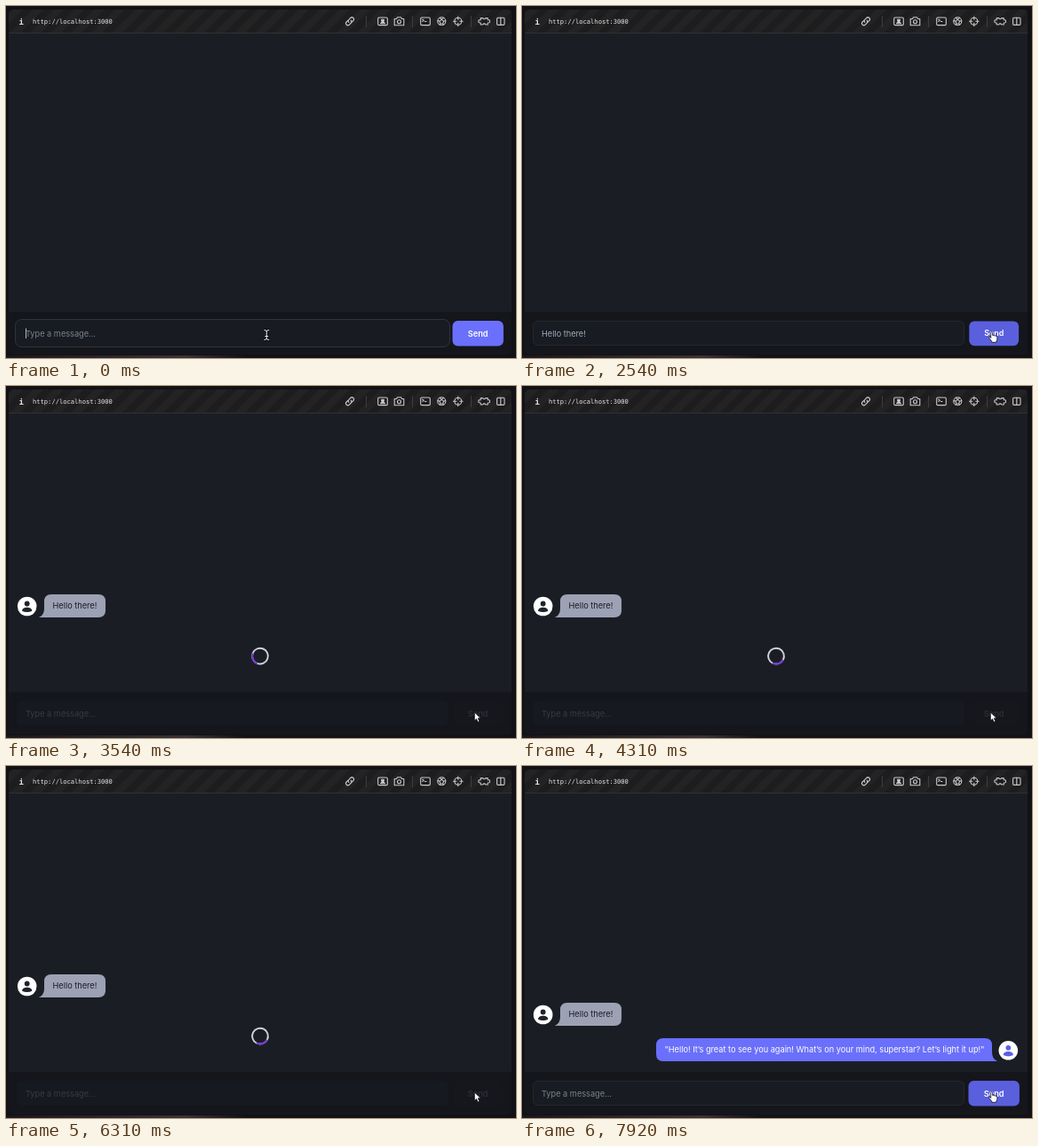
These frames come from a looping animation (574x397 px, 8000 ms). An HTML page:

```html
<!DOCTYPE html>
<html lang="en">
<head>
<meta charset="utf-8">
<title>Chat</title>
<style>
  html, body { margin: 0; height: 100%; overflow: hidden; background: #121116; }
  svg { display: block; width: 574px; height: 397px; }
  text { font: 9.2px Inter, sans-serif; white-space: pre; }
  .mono { font: 7.12px "DejaVu Sans Mono", monospace; fill: #e4e4e6; }
  .icons { fill: none; stroke: #c9c9cb; stroke-width: 1.1; stroke-linejoin: round; stroke-linecap: round; }
  .pointer { fill: #fff; stroke: #111; stroke-width: .8; stroke-linejoin: round; }
</style>
</head>
<body>
<svg viewBox="0 0 574 397">
  <defs>
    <pattern id="stripes" width="23" height="23" patternUnits="userSpaceOnUse" patternTransform="skewX(-45)">
      <rect width="23" height="23" fill="#242324"/>
      <rect width="11.5" height="23" fill="#1d1c1e"/>
    </pattern>
    <linearGradient id="glow">
      <stop offset="0" stop-color="#1b171a"/>
      <stop offset=".75" stop-color="#3a3234"/>
      <stop offset="1" stop-color="#121116"/>
    </linearGradient>
    <g id="person">
      <circle r="10.8" fill="#fff"/>
      <circle cy="-3" r="2.9"/>
      <path d="M-5.6 5.2C-5.6 2.4-3 1.2 0 1.2S5.6 2.4 5.6 5.2Q3 6.6 0 6.6T-5.6 5.2Z"/>
    </g>
  </defs>

  <rect y="394" width="270" height="3" fill="url(#glow)"/>
  <path d="M3 31V9q0-5 5-5H564q5 0 5 5V31Z" fill="url(#stripes)"/>
  <path d="M3 30H569V345H3Z" fill="#1a1e24"/>
  <path d="M3 30.5H569" stroke="#303033"/>
  <path d="M3 345H569V388q0 5-5 5H8q-5 0-5-5Z" fill="#14161b"/>

  <text class="mono" x="14.4" y="20.5" style="font-size:9px;font-weight:bold">i</text>
  <text class="mono" x="30" y="20">http://localhost:3000</text>
  <path d="M405.5 11V24M457.5 11V24M523.5 11V24" stroke="#3d3d40"/>
  <g class="icons">
    <g transform="translate(387 17.3) rotate(-45)">
      <path d="M-1-2.2H-3.2a2.2 2.2 0 0 0 0 4.4H-.6A2.2 2.2 0 0 0 1.6 0M1 2.2H3.2a2.2 2.2 0 0 0 0-4.4H.6A2.2 2.2 0 0 0-1.6 0"/>
    </g>
    <rect x="418.7" y="13" width="10.6" height="8.6" rx="1.2"/>
    <path d="M421.5 19.7H426.5L424 17.3ZM422.7 15.3H425.3V17H422.7Z" fill="#c9c9cb"/>
    <path d="M437.2 14.5H439.4L440.5 12.8H444.5L445.6 14.5H447.8V21.7H437.2Z"/>
    <circle cx="442.5" cy="17.8" r="2"/>
    <rect x="466.7" y="13" width="10.6" height="8.6" rx="1.2"/>
    <path d="M468.8 15.2L470.3 16.3L468.8 17.4M471.5 17.5H473"/>
    <circle cx="490.3" cy="17.3" r="4.5"/>
    <path d="M488.5 13.3L490.3 15.3L492.5 13.3M490.3 15.3L488 17.2L489 20H491.6L492.6 17.2ZM486 16.5L488 17.2M494.7 16.5L492.6 17.2M489 20L488 21.2M491.6 20L492.7 21.2"/>
    <circle cx="508.8" cy="17.3" r="4"/>
    <path d="M508.8 12V15.3M508.8 19.3V22.6M503.5 17.3H506.8M510.8 17.3H514.1"/>
    <path d="M534.2 13.6H536.6Q538.2 15.8 539.8 13.6H542.2V15.6Q545.2 15.4 544.4 17.3Q545.2 19.2 542.2 19V21H539.8Q538.2 18.8 536.6 21H534.2V19Q531.2 19.2 532 17.3Q531.2 15.4 534.2 15.6Z"/>
    <rect x="552.6" y="13.2" width="8.4" height="8.2" rx="1.2"/>
    <path d="M556.8 13.2V21.4"/>
  </g>

  <g id="sent">
    <use href="#person" x="23.7" y="248.5" fill="#20222c"/>
    <path d="M37 261Q43 258.5 43 251V243q0-8 8-8H104q8 0 8 8V253q0 8-8 8Z" fill="#9ca1b4"/>
    <text x="52.5" y="250.5" fill="#191c25">Hello there!</text>
  </g>
  <g id="reply">
    <path d="M535 333Q529 330.500 529 323V315q0-8-8-8H159q-8 0-8 8V325q0 8 8 8Z" fill="#6a70fb"/>
    <text x="160.500" y="322.700" fill="#fff">"Hello! It’s great to see you again! What’s on your mind, superstar? Let’s light it up!"</text>
    <use href="#person" x="547.300" y="320.800" fill="#5a60e6"/>
  </g>
  <g id="spinner" fill="none" stroke-width="1.9">
    <circle r="8.900" stroke="#d0d2d8"/>
    <circle r="8.900" stroke="#7630e0" pathLength="360" stroke-dasharray="90 270"/>
  </g>

  <rect id="field"/>
  <text id="entry" x="22" y="372.800"></text>
  <path id="caret" d="M0 363.500V375" stroke="#b4b9c4"/>
  <g id="send">
    <rect x="-28.700" y="-14.300" width="57.400" height="28.600" rx="6"/>
    <text y="3.200" text-anchor="middle" style="font-weight:600">Send</text>
  </g>

  <g id="beam" fill="none" stroke-linecap="round">
    <path id="beamShape" d="M-2.500-5.500Q0-5.500 0-4Q0-5.500 2.500-5.500M0-4V4M-2.500 5.500Q0 5.500 0 4Q0 5.500 2.500 5.500M-1.500 1.500H1.500" stroke="#111" stroke-width="2.400"/>
    <use href="#beamShape" style="stroke:#fff"/>
    <path d="M-2.500-5.500Q0-5.500 0-4Q0-5.500 2.500-5.500M0-4V4M-2.500 5.500Q0 5.500 0 4Q0 5.500 2.500 5.500M-1.500 1.500H1.500" stroke="#eee"/>
  </g>
  <path id="arrow" class="pointer" d="M-3-4.500V5L-.8 3L.8 6.600L2.600 5.800L1 2.300H4Z"/>
  <path id="hand" class="pointer" d="M-2.600-3.600Q-2.600-5-1.600-5T-.6-3.600V-.9Q.6-1.700 1.300-.6Q2.500-1.100 3-.1Q4.500-.4 4.500 1V3Q4.500 4.500 3.600 5.600V6.800H-1.600V5.700L-4.600 1.900Q-4.800.6-3.600.9L-2.600 1.900Z"/>
</svg>
<script>
  const LOOP = 8000;
  const MESSAGE = "Hello there!";
  const KEYS = [380, 460, 690, 850, 930, 1000, 1080, 1160, 1230, 1310, 1460, 1770];
  const MOVE = 1990, HOVER = 2080, PRESS = 2460, SUBMIT = 2850, WAIT = 3000, READY = 7460, REPLY = 7540;
  const BLUE = [106, 112, 252], HOVERED = [90, 95, 222], OFF = [21, 23, 28];
  const WHITE = [255, 255, 255], FAINT = [43, 46, 53];

  const $ = id => document.getElementById(id);
  const set = (el, attrs) => { for (const k in attrs) el.setAttribute(k, attrs[k]); };
  const show = (id, on) => set($(id), { visibility: on ? "visible" : "hidden" });
  const ramp = (t, start, length) => Math.min(1, Math.max(0, (t - start) / length));
  const mix = (a, b, p) => `rgb(${a.map((v, i) => v + (b[i] - v) * p)})`;

  function drawField(t) {
    const focused = t < PRESS, disabled = t >= SUBMIT && t < REPLY;
    const typed = t < WAIT ? MESSAGE.slice(0, KEYS.filter(k => k <= t).length) : "";
    const inset = focused ? 0 : 2;
    set($("field"), {
      x: 10.5 + inset, y: 353.5 + inset, width: 489 - 2 * inset, height: 31 - 2 * inset, rx: 7 - inset,
      fill: disabled ? "#16191f" : "#181c22",
      stroke: disabled ? "#16191f" : focused ? "#30343b" : "#23272e"
    });
    $("entry").textContent = typed || "Type a message...";
    set($("entry"), { fill: disabled ? (typed ? "#454951" : "#373b43") : typed ? "#a3a9b6" : "#7b818d" });
    const x = typed ? 22.5 + $("entry").getComputedTextLength() : 22.5;
    set($("caret"), { transform: `translate(${x})` });
    show("caret", t < 2270);
  }

  function drawButton(t) {
    const [box, label] = $("send").children;
    const off = ramp(t, WAIT, 200), on = ramp(t, REPLY, 200);
    box.setAttribute("fill", t < WAIT ? mix(BLUE, HOVERED, ramp(t, HOVER, 200))
      : t < REPLY ? mix(HOVERED, OFF, off) : mix(OFF, HOVERED, on));
    label.setAttribute("fill", t < REPLY ? mix(WHITE, FAINT, off) : mix(FAINT, WHITE, on));
    const scale = 1 - .035 * (ramp(t, PRESS, 100) - off);
    set($("send"), { transform: `translate(531.2 369.3) scale(${scale})` });
  }

  function drawPointer(t) {
    const p = ramp(t, MOVE, 240);
    const x = 293.3 + 237 * p * (2 - p);
    const overButton = t >= HOVER;
    const hand = overButton && (t < SUBMIT || t >= READY);
    for (const id of ["beam", "arrow", "hand"])
      set($(id), { transform: `translate(${x} ${371 + 1.5 * p})` });
    show("beam", t < KEYS[0] || (t >= MOVE && !overButton));
    show("hand", hand);
    show("arrow", overButton && !hand);
  }

  function frame(now) {
    const t = now % LOOP;
    drawField(t);
    drawButton(t);
    drawPointer(t);
    show("sent", t >= WAIT);
    show("reply", t >= REPLY);
    show("spinner", t >= WAIT && t < REPLY);
    set($("sent"), { transform: `translate(0 ${t < REPLY ? 0 : 32})` });
    set($("spinner"), { transform: `translate(286 304.6) rotate(${t * .36 - 84.4})` });
    requestAnimationFrame(frame);
  }
  requestAnimationFrame(frame);
</script>
</body>
</html>
```
